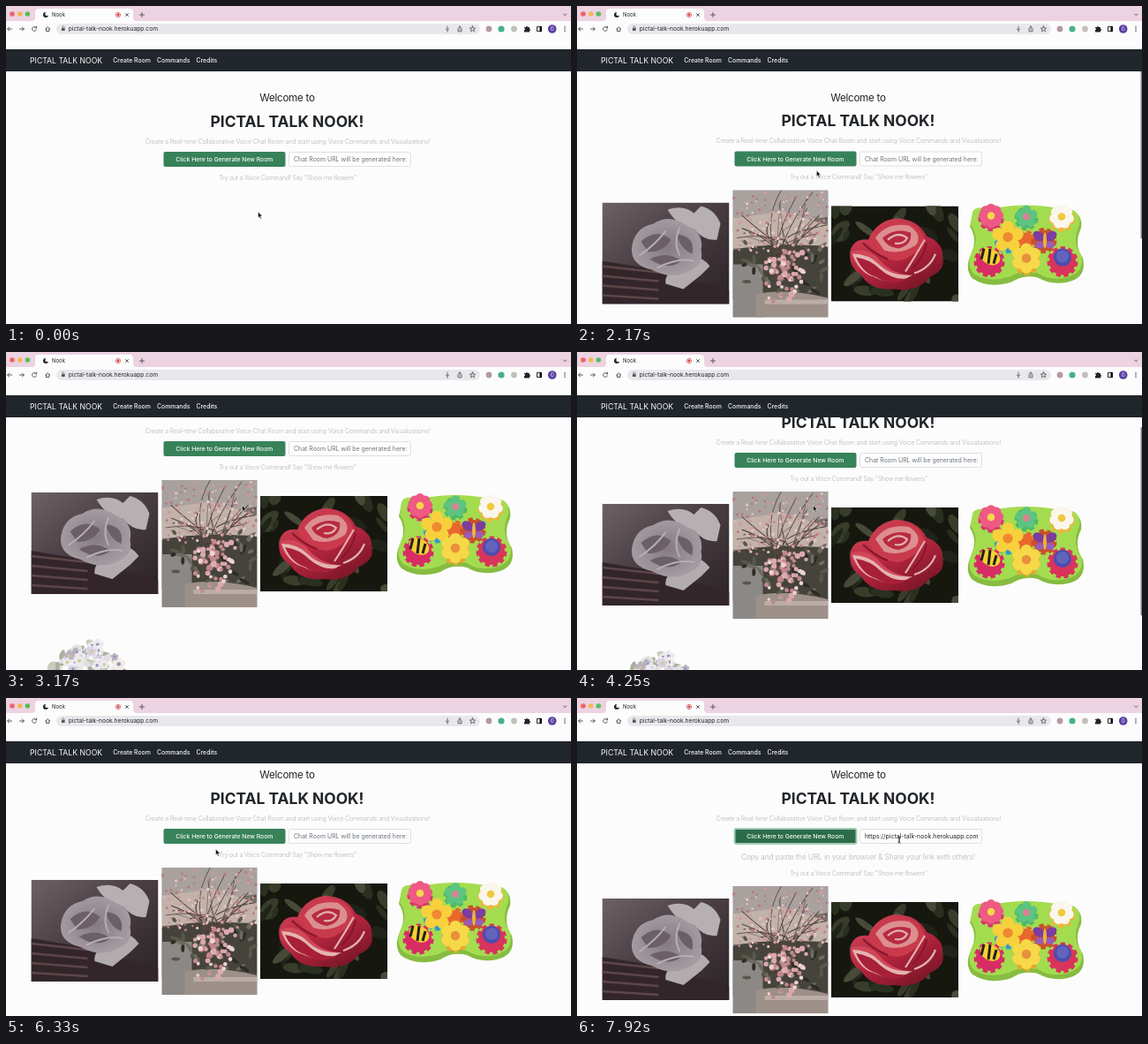
An HTML page for the animation above (8 s loop, 640x360 px).

```html
<!DOCTYPE html>
<html lang="en">
<head>
<meta charset="utf-8">
<title>Talk room demo</title>
<style>
html, body { margin: 0; width: 100%; height: 100%; overflow: hidden; background: #fcfcfc; }
svg { display: block; width: 100%; height: 100%; font-family: Inter, "Open Sans", sans-serif; }
.mid { text-anchor: middle; }
.ink { fill: #212529; }
.soft { fill: #b4b4bc; font-weight: 300; }
.nav { fill: #f8f8f8; font-size: 6.9px; font-weight: 500; }
.line { fill: none; stroke: #4a4a50; stroke-linecap: round; }
</style>
</head>
<body>
<svg viewBox="0 0 640 360">
  <defs>
    <linearGradient id="dusk" x2="1" y2="1">
      <stop stop-color="#6c6266"/><stop offset=".45" stop-color="#4a3e42"/><stop offset="1" stop-color="#2a2226"/>
    </linearGradient>
    <radialGradient id="mauve"><stop stop-color="#857a82"/><stop offset="1" stop-color="#a39ba2"/></radialGradient>
    <linearGradient id="petal" x2=".7" y2="1">
      <stop stop-color="#d44a5c"/><stop offset=".55" stop-color="#b92640"/><stop offset="1" stop-color="#7c1628"/>
    </linearGradient>
    <clipPath id="c1"><rect width="144" height="115"/></clipPath>
    <clipPath id="c2"><rect width="108" height="144"/></clipPath>
    <clipPath id="c3"><rect width="144" height="108"/></clipPath>
    <clipPath id="field"><rect x="325" y="166" width="129.5" height="15"/></clipPath>
  </defs>
  <rect width="640" height="360" fill="#fcfcfc"/>

  <g id="page">
    <text class="mid ink" x="318.5" y="108.2" font-size="11.7" letter-spacing="-.3">Welcome to</text>
    <text class="mid ink" x="318.5" y="136.8" font-size="17.4" font-weight="700">PICTAL TALK NOOK!</text>
    <text class="mid soft" x="319" y="155.8" font-size="7" letter-spacing="-.12">Create a Real-time Collaborative Voice Chat Room and start using Voice Commands and Visualizations!</text>
    <rect id="button" x="178.5" y="165" width="138" height="17" rx="2"/>
    <text class="mid" x="247.3" y="176" font-size="6.8" font-weight="500" fill="#f8fcf8">Click Here to Generate New Room</text>
    <rect x="320.5" y="165.5" width="138" height="16" rx="2" fill="#fdfdfd" stroke="#d8d8dc" stroke-width=".8"/>
    <g clip-path="url(#field)"><text id="url" x="326" y="176" font-size="6.95"></text></g>
    <text id="copy" class="mid soft" x="318.5" y="199.5" font-size="8.3" letter-spacing="-.08">Copy and paste the URL in your browser &amp; Share your link with others!</text>
    <g id="results">
      <text class="mid soft" x="319" y="196.8" font-size="7" letter-spacing="-.2">Try out a Voice Command! Say "Show me flowers"</text>
      <g id="photos">
        <g id="iris" transform="translate(28.5 223)" clip-path="url(#c1)"></g>
        <g id="blossom" transform="translate(176.5 209)" clip-path="url(#c2)"></g>
        <g id="rose" transform="translate(288 227)" clip-path="url(#c3)"></g>
        <g id="bouquet" transform="translate(36 386)"></g>
      </g>
      <g id="toy"></g>
    </g>
  </g>
  <rect id="thumb" x="638.6" width="1.4" height="213" fill="#77777c"/>

  <rect width="640" height="49" fill="#fcfcfc"/>
  <rect y="49" width="640" height="25" fill="#20262b"/>
  <text x="27" y="65" font-size="8.7" fill="#f8f8f8">PICTAL TALK NOOK</text>
  <text class="nav" x="121.3" y="64.3">Create Room</text>
  <text class="nav" x="171" y="64.3">Commands</text>
  <text class="nav" x="215.5" y="64.3">Credits</text>

  <g id="browser">
    <rect width="640" height="17" fill="#edd2e2"/>
    <path d="M29 17q4 0 4-4V7q0-4 4-4H140q4 0 4 4v6q0 4 4 4z" fill="#fcfcfc"/>
    <circle cx="7" cy="9" r="2.8" fill="#ee6468"/><circle cx="15.7" cy="9" r="2.8" fill="#f0b850"/><circle cx="24.4" cy="9" r="2.8" fill="#58bd5c"/>
    <circle cx="45" cy="10" r="3" fill="#212529"/><circle cx="46.5" cy="8.9" r="2.2" fill="#fcfcfc"/>
    <text x="52" y="12.3" font-size="6" class="ink">Nook</text>
    <circle cx="127" cy="10" r="2.6" fill="none" stroke="#d84c50" stroke-width=".8"/><circle cx="127" cy="10" r="1.4" fill="#d0383c"/>
    <path class="line" stroke-width=".9" d="M135.5 8.5l3 3m0-3l-3 3M151.5 10h5m-2.5-2.5v5M631.5 9l1.7 1.7 1.7-1.7"/>
    <path class="line" stroke-width=".9" d="M6.5 26H1.7m2-2l-2 2 2 2M15.5 26h4.8m-2-2l2 2-2 2M34.3 24.6a2.5 2.5 0 1 0 .2 2.2M34.6 23v1.8h-1.8M44.7 26l2.5-2.4 2.5 2.4m-4.2-.5v3h3.4v-3"/>
    <rect x="57" y="20" width="480" height="12" rx="6" fill="#e8e8ec"/>
    <rect x="63" y="25" width="3.6" height="3" fill="#55555a"/><path class="line" stroke-width=".6" d="M63.7 25v-1a1.1 1.1 0 0 1 2.2 0v1"/>
    <text x="172" y="28.3" text-anchor="end" font-size="6.7" class="ink">pictal-talk-nook.herokuapp.com</text>
    <path class="line" stroke-width=".8" d="M500 23v3.5m-1.7-.5q1.7 3 3.4 0M500 28v1.3M514 27v-4m-1.4 1.3l1.4-1.4 1.4 1.4M512 25.6v3.2h4v-3.2M528.5 22.8l.9 2.2 2.3.1-1.8 1.4.6 2.3-2-1.3-2 1.3.6-2.3-1.8-1.4 2.3-.1z"/>
    <circle cx="547" cy="26" r="3.4" fill="#b49a9e"/><circle cx="561" cy="26" r="3.6" fill="#48b088"/><circle cx="575.5" cy="26" r="3.4" fill="#c0c0b8"/>
    <path d="M587 24h2a1 1 0 0 1 2 0h2v2a1 1 0 0 1 0 2v1.5h-6V27a1 1 0 0 0 0-2z" fill="#212529"/>
    <path d="M601.5 23.3h5v5.4h-5z" fill="none" stroke="#212529"/><path d="M604.5 23h2v6h-2z"/>
    <circle cx="618.7" cy="26" r="4.8" fill="#5a3ea4"/><text class="mid" x="618.7" y="28" font-size="5.5" fill="#f8f8f8">G</text>
    <g fill="#4a4a50"><circle cx="633" cy="23.8" r=".8"/><circle cx="633" cy="26" r=".8"/><circle cx="633" cy="28.2" r=".8"/></g>
  </g>

  <path id="arrow" d="M0 0v6.8l1.6-1.4 1.1 2.5 1.2-.5-1.1-2.4h2.1z" fill="#111" stroke="#fcfcfc" stroke-width=".5"/>
  <path id="beam" d="M-1.6-3.6q1.6 0 1.6 1v5.2q0 1-1.6 1m3.2 0q-1.6 0-1.6-1v-5.2q0-1 1.6-1" fill="none" stroke="#212529" stroke-width=".8"/>
</svg>
<script>
const $ = id => document.getElementById(id);
let seed = 11;
const rand = (a, b) => a + (b - a) * ((seed = seed * 16807 % 2147483647) / 2147483647);
const repeat = (n, make) => Array.from({length: n}, (_, i) => make(i)).join("");
const dot = (x, y, r, fill) => `<circle cx="${x}" cy="${y}" r="${r}" fill="${fill}"/>`;
const oval = (x, y, rx, ry, fill, turn = 0) =>
  `<ellipse rx="${rx}" ry="${ry}" fill="${fill}" transform="translate(${x} ${y}) rotate(${turn})"/>`;
const shape = (d, fill) => `<path d="${d}" fill="${fill}"/>`;
const stroke = (d, color, width) => `<path d="${d}" fill="none" stroke="${color}" stroke-width="${width}"/>`;
const pick = list => list[Math.floor(rand(0, list.length))];

function flower(x, y, r, petals, color, center) {
  return repeat(petals, i => {
    const a = i * 2 * Math.PI / petals - Math.PI / 2;
    return dot(x + r * .65 * Math.cos(a), y + r * .65 * Math.sin(a), r * .42, color);
  }) + dot(x, y, r * .5, color) + dot(x, y, r * .33, center);
}
const gear = (x, y, r, color) => dot(x, y, r - 2, color) +
  `<circle cx="${x}" cy="${y}" r="${r - 2}" fill="none" stroke="${color}" stroke-width="5" stroke-dasharray="5 3.5"/>`;

$("iris").innerHTML =
  shape("M0 0h144v115H0z", "url(#dusk)") +
  shape("M0 66L60 76 144 100V115H0z", "#33262a") +
  repeat(4, i => stroke(`M0 ${72 + i * 11}L64 ${79 + i * 10}`, "#5e4648", 2.5)) +
  shape("M74 8Q92 2 104 12L112 4Q128 8 134 24L130 42Q116 44 104 30Q86 28 74 8z", "#b6b0b2") +
  shape("M96 62Q112 58 122 72L112 82 92 98 72 92Q70 82 82 76z", "#b2acae") +
  shape("M34 48Q38 28 58 24Q76 12 96 26Q116 34 112 54Q116 70 98 78Q78 88 56 76Q30 70 34 48z", "url(#mauve)") +
  shape("M44 44Q62 28 78 42Q70 56 52 56zM84 36Q106 38 102 58Q90 54 84 36zM54 64Q74 54 90 66Q74 78 54 64z", "#6c6068") +
  stroke("M42 60Q60 48 72 32M62 74Q86 62 104 66M88 28Q80 46 88 60", "#b6aeb6", 2);

$("blossom").innerHTML =
  shape("M0 0h108v144H0z", "#77706c") +
  shape("M0 0h108v30L0 46z", "#a9a19e") + shape("M0 32L58 24 108 40V62L0 66z", "#c2b2aa") +
  shape("M0 68Q40 58 108 64V124H0z", "#45433c") + shape("M0 84h34v60H0z", "#8c8886") +
  shape("M26 118Q60 110 108 122V144H26z", "#9d9089") + shape("M36 124h72v5H36z", "#bcaea6") +
  repeat(40, () => oval(rand(14, 108), rand(58, 116), rand(3, 7), 2, pick(["#2c2c26", "#56594a", "#6e6a60"]), rand(0, 180))) +
  repeat(24, i => stroke(`M${46 + i} ${112 - i * 2}Q${rand(30, 80)} ${rand(40, 70)} ${rand(0, 108)} ${rand(0, 60)}`, "#544640", rand(.5, 1.3))) +
  repeat(150, () => dot(rand(0, 108), rand(2, 72), rand(.8, 2), pick(["#cf9aa2", "#e4c6c4", "#b87880"]))) +
  repeat(65, () => dot(60 + rand(-13, 13) + rand(-13, 13), 96 + rand(-16, 16) + rand(-16, 16), rand(1.8, 3.4), pick(["#dba8b0", "#c48790", "#ecd2d0"])));

$("rose").innerHTML =
  shape("M0 0h144v108H0z", "#16170f") +
  repeat(34, () => oval(rand(0, 144), rand(0, 108), rand(7, 15), rand(3, 7), pick(["#2a3020", "#383d2a", "#20231a", "#484a38"]), rand(0, 180))) +
  shape("M22 50Q26 36 42 38Q50 18 72 14Q98 14 108 34Q128 42 126 58Q130 72 112 80Q98 98 72 94Q44 96 34 78Q18 68 22 50z", "url(#petal)") +
  shape("M22 52Q38 46 52 58Q66 76 88 78Q62 90 44 76Q28 72 22 52z", "#d04858") +
  shape("M24 54Q42 54 54 66Q68 80 92 78Q70 92 48 80Q32 76 24 54z", "#e4b4b0") +
  shape("M28 58Q44 60 56 72Q70 84 86 82Q68 92 50 80Q36 76 28 58z", "#a82038") +
  shape("M42 40Q50 20 74 16Q100 18 106 38Q96 58 76 62Q52 60 42 40z", "#c83a4c") +
  shape("M50 36Q62 18 88 22Q104 32 96 44Q78 56 60 50z", "#dc8f90") +
  shape("M58 36Q72 24 90 30Q92 44 76 48Q62 46 58 36z", "#b82a40") +
  stroke("M64 38Q76 28 86 36Q82 44 72 42M94 76Q112 70 118 54M106 38Q92 62 84 74", "#e2b0ae", 2.2) +
  stroke("M36 42Q48 54 64 60M108 42Q104 60 92 70", "#84162a", 2);

// A point inside the dome of the bouquet.
function inDome() {
  const a = rand(-Math.PI, 0), r = Math.sqrt(rand(0, 1));
  return [56 + 44 * r * Math.cos(a), 50 + 42 * r * Math.sin(a)];
}
$("bouquet").innerHTML =
  repeat(60, () => oval(...inDome(), rand(4, 8), rand(2, 4), pick(["#c8ccbc", "#aab09c", "#e2e0e0"]), rand(0, 180))) +
  repeat(26, () => flower(...inDome(), rand(4, 7), 5, pick(["#eceaf0", "#d6d0de", "#f0ece8", "#b8b0c4"]), pick(["#d8c888", "#9a94b0"])));

$("toy").innerHTML =
  shape("M50 236Q52 228 72 232Q110 224 150 232Q176 230 173 252Q164 270 175 286Q180 308 158 313Q140 317 124 308Q108 304 94 313Q68 321 50 309Q40 298 49 280Q56 264 47 250z", "#86bc40") +
  shape("M50 234Q52 226 72 230Q110 222 150 230Q174 228 171 248Q162 268 173 282Q178 302 156 308Q138 312 124 303Q108 298 92 307Q68 314 52 304Q42 294 50 277Q58 262 48 248z", "#a4dc50") +
  gear(71, 241, 14, "#d8346c") + gear(111, 241, 13, "#50b868") + gear(151, 242, 14, "#f0b43c") +
  gear(90, 265, 15, "#2c98cc") + gear(111, 266, 11, "#e8682c") + gear(131, 266, 14, "#c8502c") +
  gear(69, 290, 17, "#d82c64") + gear(111, 290, 15, "#e8a830") + gear(152, 290, 17, "#d8345c") +
  flower(71, 238, 13, 8, "#ee5a84", "#f5d64c") +
  flower(111, 239, 12, 5, "#5cc480", "#d88494") +
  flower(151, 239, 13, 7, "#fbf6ec", "#f0c83c") +
  flower(90, 262, 17, 5, "#f8d03c", "#ee8a32") +
  oval(125, 261, 7, 5, "#7c3ca0", 35) + oval(139, 261, 7, 5, "#7c3ca0", -35) +
  oval(126, 271, 5, 4, "#9a5cb8") + oval(138, 271, 5, 4, "#9a5cb8") + oval(132, 266, 2, 9, "#e6b540") +
  oval(70, 284, 12, 9, "#f4d030", 30) + stroke("M63 275l-3 12M70 275l-2 17M77 281l-3 11", "#22201c", 3) +
  flower(111, 286, 16, 6, "#f6d848", "#e8903c") +
  dot(152, 285, 10, "#4c4cb0") + dot(152, 284, 7, "#6264bc");

// Eased value through [time, value] points.
function track(t, points) {
  for (let i = 1; i < points.length; i++) {
    const [t0, a] = points[i - 1], [t1, b] = points[i];
    if (t <= t0) return a;
    if (t < t1) {
      const k = (t - t0) / (t1 - t0);
      return a + (b - a) * k * k * (3 - 2 * k);
    }
  }
  return points[points.length - 1][1];
}
const scrollPath = [[2150, 0], [2580, 64], [4140, 64], [4460, 17]];
const cursorX = [[1750, 285.5], [2350, 267.5], [5950, 267.5], [6330, 237.5], [6500, 247], [6800, 247], [7450, 365]];
const cursorY = [[1750, 233], [2350, 173.5], [5950, 173.5], [6330, 171], [6500, 157], [6800, 157], [7450, 160.5]];
const show = (id, on) => $(id).setAttribute("visibility", on ? "visible" : "hidden");
const move = (id, x, y) => $(id).setAttribute("transform", `translate(${x} ${y})`);

function draw(t) {
  const scroll = track(t, scrollPath), loaded = t >= 1750, created = t >= 6540;
  move("page", 0, -scroll);
  move("results", 0, created ? 21 : 0);
  move("toy", loaded ? 398 : 0, 0);
  show("toy", t >= 900);
  show("photos", loaded);
  show("copy", created);
  show("thumb", t > 2150 && t < 3100 || t > 4200 && t < 4950);
  $("thumb").setAttribute("y", 50 + scroll * .69);
  $("url").textContent = created ? "https://pictal-talk-nook.herokuapp.com" : "Chat Room URL will be generated here:";
  $("url").setAttribute("fill", created ? "#212529" : "#6c757d");
  $("button").setAttribute("fill", created ? "#2c6c4a" : "#38825a");
  $("button").setAttribute("stroke", created ? "#a4ccb4" : "none");
  $("button").setAttribute("stroke-width", 2);

  const overText = t > 4400 && t < 6050 || t > 7150;
  const x = track(t, cursorX), y = track(t, cursorY);
  show("arrow", !overText);
  show("beam", overText);
  move("arrow", x, y);
  move("beam", x, y);
}
function tick() {
  draw(performance.now() % 8000);
  requestAnimationFrame(tick);
}
tick();
</script>
</body>
</html>
```
